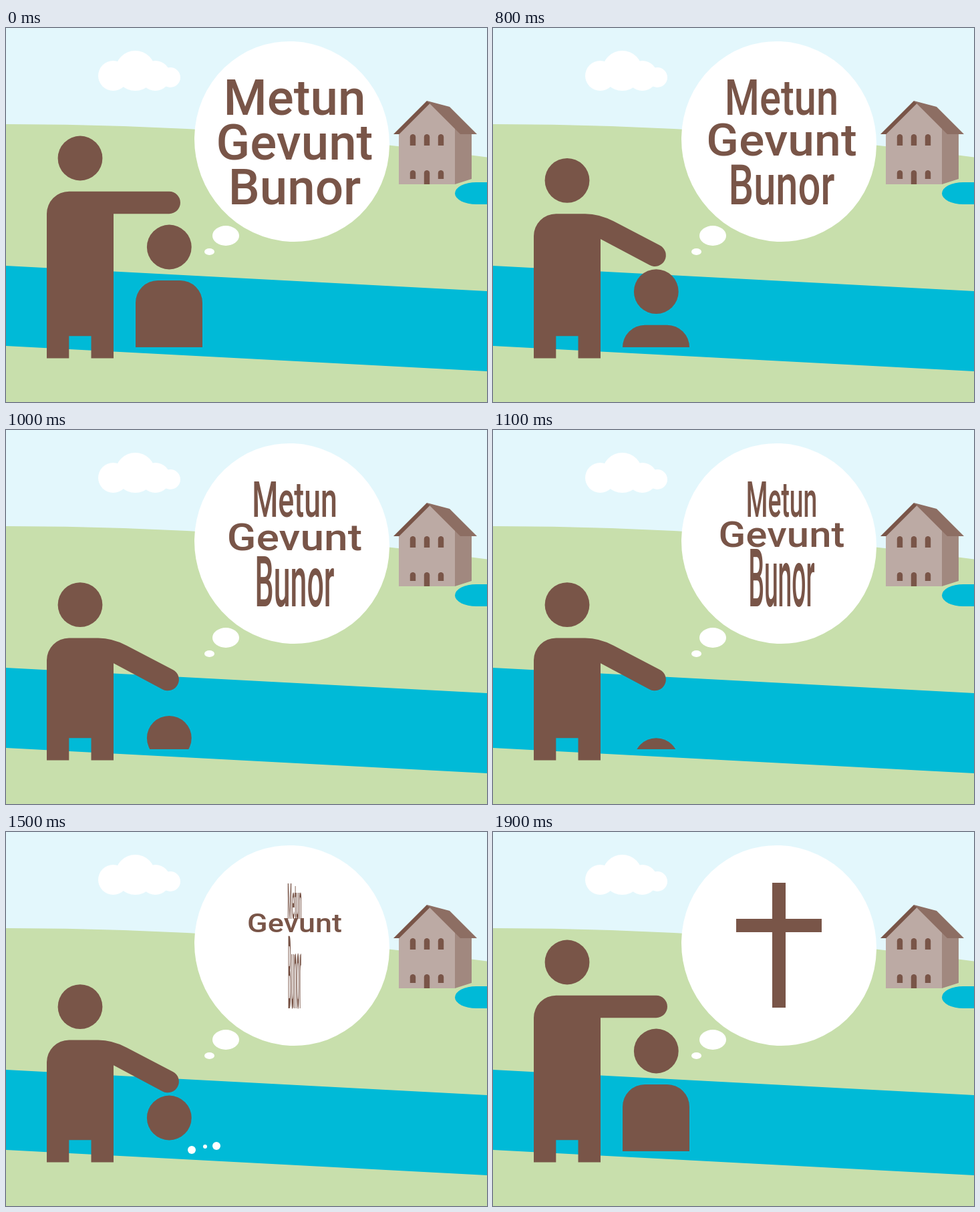
These frames come from a looping animation (720 px wide and 560 px high, 7400 ms). An HTML page with a canvas:

```html
<!DOCTYPE html>
<html lang="de">
<head>
<meta charset="utf-8">
<title>Baptism</title>
<style>
html, body { margin: 0; width: 100%; height: 100%; overflow: hidden; }
canvas { display: block; }
</style>
</head>
<body>
<canvas id="stage" width="720" height="560"></canvas>
<script>
const ctx = document.getElementById('stage').getContext('2d');
const LOOP = 7400, START = 700, STEP = 100, LAST = 13;
const BROWN = '#795548', WHITE = '#fff', GRASS = '#c8dfac', WATER = '#00bad7';
const UNIT = 100 / 3;

function fill(color, trace) {
  ctx.fillStyle = color;
  ctx.beginPath();
  trace();
  ctx.fill();
}

function poly(color, ...pts) {
  fill(color, () => {
    for (let i = 0; i < pts.length; i += 2) ctx.lineTo(pts[i], pts[i + 1]);
  });
}

function oval(color, x, y, rx, ry = rx, turn = 0) {
  fill(color, () => ctx.ellipse(x, y, rx, ry, turn, 0, Math.PI * 2));
}

function box(color, x, y, w, h) {
  ctx.fillStyle = color;
  ctx.fillRect(x, y, w, h);
}

// Keys sit at steps 1, 3, 5, 7 and 9.
function keyed(step, keys) {
  const p = Math.max(0, Math.min(keys.length - 1, (step - 1) / 2));
  const i = Math.min(Math.floor(p), keys.length - 2);
  return keys[i] + (keys[i + 1] - keys[i]) * (p - i);
}

function arch(x, y, h) {
  fill(BROWN, () => {
    ctx.arc(x, y + 4.2, 4.2, Math.PI, 0);
    ctx.lineTo(x + 4.2, y + h);
    ctx.lineTo(x - 4.2, y + h);
  });
}

function house() {
  poly('#a1887f', 672, 150, 697, 158, 697, 226, 672, 234);
  poly('#bcaaa4', 588, 158, 634, 112, 672, 150, 672, 234, 588, 234);
  poly('#8d6e63', 630, 109, 664, 118, 705, 159, 680, 159);
  poly(BROWN, 630, 109, 634.5, 113, 588.5, 159, 580, 159);
  for (const x of [609, 630, 651]) {
    arch(x, 159, 17);
    arch(x, 213, x === 630 ? 21 : 13);
  }
}

function scenery() {
  box('#e3f7fc', 0, 0, 720, 560);
  fill(GRASS, () => {
    ctx.moveTo(0, 144);
    ctx.quadraticCurveTo(360, 144, 720, 193.5);
    ctx.lineTo(720, 560);
    ctx.lineTo(0, 560);
  });
  poly(WATER, 0, 356, 720, 394, 720, 514, 0, 476);
  oval(WATER, 704, 247.5, 32, 16.5);
  box(WATER, 704, 231, 16, 33);
  oval(WHITE, 160.5, 71.5, 22.5);
  oval(WHITE, 193.5, 64, 30);
  oval(WHITE, 223.5, 71.5, 22.5);
  oval(WHITE, 246, 74, 15);
  house();
  oval(WHITE, 428, 170, 150.7, 145.3, 1.208);
  oval(WHITE, 329, 311, 20, 15);
  oval(WHITE, 304.5, 335, 7.5, 5);
}

function man(drop, bent) {
  const top = 244.8 + drop;
  oval(BROWN, 111, 195 + drop, 33.4);
  fill(BROWN, () => {
    ctx.moveTo(61, 494.5);
    ctx.lineTo(61, top + UNIT);
    ctx.arc(61 + UNIT, top + UNIT, UNIT, Math.PI, Math.PI * 1.5);
    if (bent) {
      ctx.lineTo(138, top);
      ctx.quadraticCurveTo(159, top, 180.5, top + 11.2);
      ctx.arc(242.2, top + 62.2, UNIT / 2, -1.09, 2.05);
      ctx.lineTo(161, top + 37.8);
    } else {
      ctx.arc(244.3, top + UNIT / 2, UNIT / 2, -Math.PI / 2, Math.PI / 2);
      ctx.lineTo(161, top + UNIT);
    }
    ctx.lineTo(161, 494.5);
    ctx.lineTo(127.5, 494.5);
    ctx.lineTo(127.5, 461.3);
    ctx.lineTo(94.3, 461.3);
    ctx.lineTo(94.3, 494.5);
  });
}

function child(drop) {
  ctx.save();
  ctx.beginPath();
  ctx.rect(0, 0, 720, 478);
  ctx.clip();
  oval(BROWN, 244.3, 328 + drop, 33.4);
  fill(BROWN, () => ctx.roundRect(194, 378 + drop, 100, 150, UNIT));
  ctx.restore();
}

function bubbles(step) {
  if (step === 7 || step === 8) {
    oval(WHITE, 267, 470, 6);
    oval(WHITE, 288, 460, 3);
    oval(WHITE, 287, 476, 6);
    oval(WHITE, 307, 471, 3);
  } else if (step === 9) {
    oval(WHITE, 278, 476, 6);
    oval(WHITE, 298, 471, 3);
    oval(WHITE, 315, 470, 6);
  }
}

function word(text, base, sx, sy) {
  ctx.save();
  ctx.translate(432, base);
  ctx.scale(sx, sy);
  ctx.fillStyle = BROWN;
  ctx.font = '500 74.5px Roboto, sans-serif';
  ctx.textAlign = 'center';
  ctx.fillText(text, 0, 0);
  ctx.restore();
}

function thought(step) {
  if (step < 10) {
    const narrow = 1 - step / 10;
    word('Metun', 130, narrow, 1);
    word('Gevunt', keyed(step, [197, 184, 175, 165, 150]),
      keyed(step, [1, .92, .805, .683, .604]), keyed(step, [1, .8, .71, .62, .53]));
    word('Bunor', 263.5, narrow, keyed(step, [1, 1.23, 1.62, 1.83, 2.04]));
  } else {
    const top = step < LAST ? 69 : 76;
    box(BROWN, 418, top, 20, 263 - top);
    box(BROWN, 364, 130, 128, 20);
  }
}

function draw(now) {
  const t = now % LOOP;
  const step = t < START ? 0 : Math.min(LAST, Math.floor((t - START) / STEP) + 1);
  const depth = Math.max(0, Math.min(step, 5, 12 - step));
  scenery();
  thought(step);
  bubbles(step);
  child(depth * UNIT);
  man(Math.max(0, Math.min(2, depth - 1)) * UNIT, depth > 0);
}

const begin = performance.now();
function tick() {
  draw(performance.now() - begin);
  requestAnimationFrame(tick);
}
tick();
</script>
</body>
</html>
```
